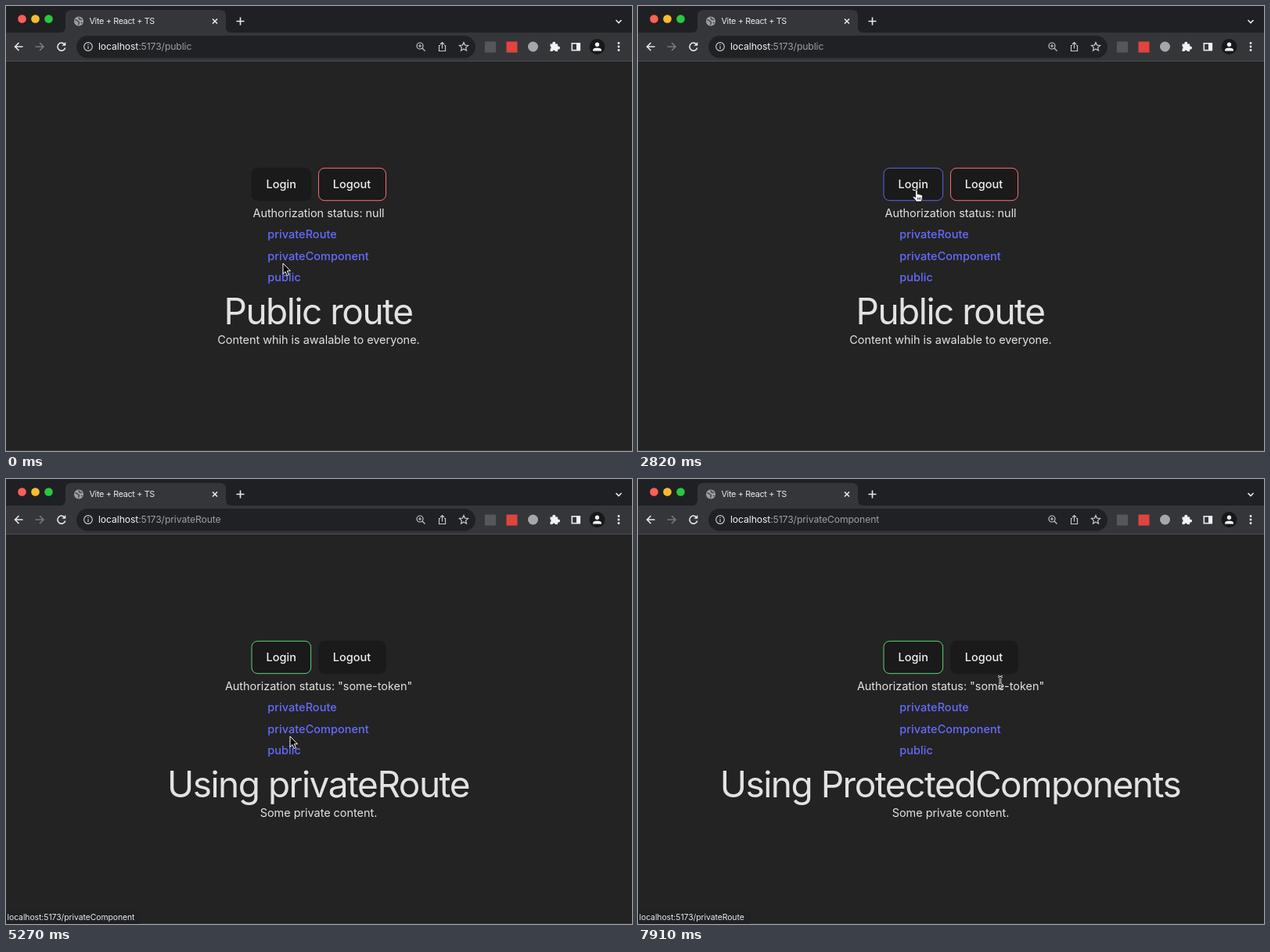
Write an HTML page that moves like this. It is 800 by 569 pixels and loops after 8 s.

```html
<!DOCTYPE html>
<html lang="en">
<head>
<meta charset="utf-8">
<title>Protected routes demo</title>
<style>
  html, body { margin: 0; width: 100%; height: 100%; overflow: hidden; background: #232323; }
  svg { display: block; width: 100vw; height: 100vh; }
  text { font-family: Inter, Roboto, sans-serif; font-optical-sizing: none; }
  .body { font-size: 14.5px; letter-spacing: -.05px; fill: #e2e2e2; }
  .mid { text-anchor: middle; }
  .strong { font-size: 14.5px; letter-spacing: .03px; font-weight: 500; fill: #f0f0f0; }
  .link { fill: #646cff; }
  .title { font-size: 46px; letter-spacing: -1.5px; fill: #e2e2e2; }
  .tab { font-size: 10.8px; letter-spacing: -.33px; fill: #e8eaed; }
  .url { font-size: 12.2px; letter-spacing: -.1px; fill: #9aa0a6; }
  .status { font-size: 10.4px; letter-spacing: -.06px; fill: #e8eaed; }
  .icon { fill: none; stroke: #e8eaed; stroke-width: 1.6; }
  .thin { fill: none; stroke: #c4c7ca; stroke-width: 1.2; }
</style>
</head>
<body>
<svg viewBox="0 0 800 569" preserveAspectRatio="none">
  <rect width="800" height="569" fill="#232323"/>

  <!-- window frame and tab -->
  <rect width="800" height="34" fill="#1f2023"/>
  <circle cx="20.5" cy="16.5" r="5.3" fill="#ff5f57"/>
  <circle cx="37.5" cy="16.5" r="5.3" fill="#febc2e"/>
  <circle cx="54.5" cy="16.5" r="5.3" fill="#28c840"/>
  <path d="M69 34q7 0 7-7V13q0-8 8-8H273q8 0 8 8V27q0 7 7 7z" fill="#35363a"/>
  <circle cx="93" cy="19.5" r="6" fill="#9aa0a6"/>
  <path d="M88.5 17.5l3 1.5 2 2-1 3M93 14.500l1 2.500 3 .5M96 21l1.500 1" fill="none" stroke="#45464a" stroke-width="1.5"/>
  <text class="tab" x="106.5" y="23.3">Vite + React + TS</text>
  <path class="icon" d="M264 16.500l6 6m0-6l-6 6"/>
  <path class="icon" d="M299.500 14.500v10m-5-5h10"/>
  <path class="icon" d="M779.500 18l3.500 3.500 3.500-3.500"/>

  <!-- toolbar -->
  <rect y="34" width="800" height="36" fill="#35363a"/>
  <rect y="70" width="800" height="1" fill="#4c4d50"/>
  <rect x="90" y="38" width="510" height="28.500" rx="14.250" fill="#202124"/>
  <path class="icon" d="M21.500 52H11.500m5-5l-5 5 5 5"/>
  <path class="icon" d="M37.500 52H48m-5-5l5 5-5 5" style="stroke:#77797d"/>
  <path class="icon" d="M75 49.200A5 5 0 1 0 75.700 53.500"/>
  <path d="M76.300 46v4.700h-4.700z" fill="#e8eaed"/>
  <circle class="thin" cx="105" cy="52" r="5.300"/>
  <path class="thin" d="M105 51.300v3.700M105 48.800v1.300"/>
  <text class="url" x="118" y="56.300"><tspan fill="#f1f3f4">localhost</tspan><tspan id="url"></tspan></text>
  <circle class="thin" cx="529" cy="51" r="4"/>
  <path class="thin" d="M532 54l3.500 3.500M527 51h4m-2-2v4"/>
  <path class="thin" d="M555 50.500h-1.500v7h8v-7H560M557.500 54.500V46.500m-2.500 2.500l2.500-2.500 2.500 2.500"/>
  <path class="thin" d="M585 46.500l1.600 3.600 4 .4-3 2.600.9 3.900-3.500-2-3.500 2 .9-3.900-3-2.600 4-.4z"/>
  <rect x="612" y="45.500" width="14" height="14" fill="#55575a"/>
  <rect x="639.500" y="45.500" width="14" height="14" fill="#e0443e"/>
  <circle cx="673.500" cy="52" r="6.500" fill="#a5a7aa"/>
  <path d="M695.500 48.500h3a2 2 0 1 1 3.600 0h3v3.200a2 2 0 1 1 0 3.600v2.700h-3.200a1.800 1.800 0 0 0-3.500 0h-2.900v-3.100a1.800 1.800 0 0 0 0-3.300z" fill="#f1f3f4"/>
  <rect x="723.300" y="47.800" width="10" height="8.800" class="icon"/>
  <rect x="729" y="47.500" width="5" height="9.500" fill="#f1f3f4"/>
  <circle cx="755.500" cy="52" r="10" fill="#17181a"/>
  <circle cx="755.500" cy="49.300" r="2.700" fill="#f1f3f4"/>
  <path d="M750 57.500v-1q0-3 5.500-3t5.500 3v1z" fill="#f1f3f4"/>
  <g fill="#e8eaed"><circle cx="783" cy="47.500" r="1.400"/><circle cx="783" cy="52" r="1.400"/><circle cx="783" cy="56.500" r="1.400"/></g>

  <!-- page -->
  <rect id="login" x="314" y="207.300" width="75.600" height="41.400" rx="7.500" fill="#1a1a1a"/>
  <rect id="logout" x="399.500" y="207.300" width="86" height="41.400" rx="7.500" fill="#1a1a1a"/>
  <text class="strong mid" x="351.700" y="233.300">Login</text>
  <text class="strong mid" x="442" y="233.300">Logout</text>
  <text class="body mid" id="auth" x="399.500" y="270.300"></text>
  <text class="strong link" id="route" x="334.300" y="297.300">privateRoute</text>
  <text class="strong link" id="component" x="334.300" y="324.700">privateComponent</text>
  <text class="strong link" id="public" x="334.300" y="352">public</text>
  <text class="title mid" id="title" x="399" y="407.300"></text>
  <text class="body mid" id="content" x="399.500" y="432.200"></text>

  <rect y="568" width="800" height="1" fill="#363636"/>
  <g id="bubble">
    <path id="plate" fill="#202124"/>
    <text class="status" id="status" x="1.500" y="564"></text>
  </g>

  <!-- pointers, hot spot at 0,0 -->
  <g id="arrow" stroke="#fff" stroke-linejoin="round">
    <path d="M0 0v13.500l3-2.800 2.200 5 2.300-1-2.200-4.900h4.200z" fill="#000"/>
  </g>
  <g id="hand" stroke="#000" stroke-width=".8" stroke-linejoin="round">
    <path d="M-1.500 1q0-1.500 1.300-1.500T1.200 1v4q1.800-1 2.400.4 1.500-.6 2.100.5 2-.4 2 1.500 0 4.300-1.500 7H-.5q-1.300-2.800-4-5-1-1.600.4-2 1.200 0 2.600 1.800z" fill="#fff"/>
    <path d="M1.600 9v3M3.500 9v3M5.300 9v3" fill="none"/>
  </g>
  <defs>
    <path id="stem" d="M-3-7.500q3 0 3 2.500v10q0 2.500-3 2.500M3-7.500q-3 0-3 2.500m0 10q0 2.500 3 2.500M-2 2.500H2"/>
  </defs>
  <g id="beam" fill="none">
    <use href="#stem" stroke="#fff" stroke-width="2.600"/>
    <use href="#stem" stroke="#111"/>
  </g>
</svg>
<script>
const LOOP = 8000;
const $ = id => document.getElementById(id);

// Path, heading, content, width of the link bubble
const pages = {
  public: ['public', 'Public route', 'Content whih is awalable to everyone.', 111],
  route: ['privateRoute', 'Using privateRoute', 'Some private content.', 143],
  component: ['privateComponent', 'Using ProtectedComponents', 'Some private content.', 171]
};

// Step tracks: [start ms, value]
const pageTrack = [[0, 'public'], [4300, 'component'], [5100, 'route'], [6250, 'public'], [7500, 'component']];
const bubbleTrack = [[0, ''], [250, 'route'], [1250, 'component'], [2250, 'route'], [2750, ''], [4180, 'component'],
  [4600, 'route'], [5230, 'component'], [6000, 'public'], [7150, 'component'], [7780, 'route']];
const hoverTrack = [[0, ''], [160, 'route'], [1200, 'component'], [1950, ''], [2180, 'route'], [2380, ''],
  [4120, 'component'], [4420, ''], [4560, 'route'], [5130, 'component'], [5230, ''], [5880, 'public'],
  [6980, 'component'], [7620, 'route'], [7780, '']];
const pointerTrack = [[0, 'arrow'], [120, 'hand'], [1880, 'arrow'], [2150, 'hand'], [2420, 'beam'], [2560, 'hand'],
  [3480, 'beam'], [3600, 'arrow'], [4080, 'hand'], [5230, 'arrow'], [5880, 'hand'], [7800, 'beam']];

// Pointer path: [ms, x, y]
const path = [[0, 354, 329], [200, 356, 316], [400, 362, 288], [820, 362, 287], [1100, 372, 284], [1300, 376, 312],
  [1700, 358, 320], [1910, 355, 330], [2100, 358, 332], [2300, 366, 292], [2450, 372, 272], [2700, 356, 236],
  [3200, 356, 234], [3400, 364, 240], [3550, 374, 261], [3800, 390, 372], [3950, 390, 374], [4150, 372, 322],
  [4450, 368, 303], [4650, 372, 291], [5050, 372, 290], [5270, 363, 329], [5750, 356, 338], [5950, 350, 349],
  [6550, 349, 352], [6900, 350, 348], [7100, 372, 322], [7500, 380, 319], [7700, 400, 295], [7910, 463, 260],
  [8000, 470, 252]];

const at = (track, t) => track.findLast(step => step[0] <= t)[1];
const clamp = v => Math.min(1, Math.max(0, v));
const ease = v => v * v * (3 - 2 * v);
const fade = (t, start) => ease(clamp((t - start) / 250));
const mix = (a, b, k) => `rgb(${a.map((v, i) => Math.round(v + (b[i] - v) * k))})`;

const DARK = [26, 26, 26], BLUE = [100, 108, 255], GREEN = [92, 214, 120], RED = [255, 110, 110];

function pointerAt(t) {
  const i = Math.max(1, path.findIndex(p => p[0] > t));
  const [t0, x0, y0] = path[i - 1], [t1, x1, y1] = path[i];
  const k = ease((t - t0) / (t1 - t0));
  return [x0 + (x1 - x0) * k, y0 + (y1 - y0) * k];
}

function setText(id, value) {
  const el = $(id);
  if (el.textContent !== value) el.textContent = value;
}

function draw(t) {
  const [slug, title, content] = pages[at(pageTrack, t)];
  setText('url', ':5173/' + slug);
  setText('title', title);
  setText('content', content);
  setText('auth', 'Authorization status: ' + (t < 2950 ? 'null' : '"some-token"'));

  $('login').setAttribute('stroke', t < 3530
    ? mix(DARK, BLUE, fade(t, 2620))
    : mix(BLUE, GREEN, fade(t, 3530)));
  $('logout').setAttribute('stroke', mix(RED, DARK, fade(t, 2950)));

  const hover = at(hoverTrack, t);
  for (const id in pages) $(id).style.fill = id === hover ? '#535bf2' : '#646cff';

  const target = at(bubbleTrack, t);
  $('bubble').style.display = target ? '' : 'none';
  if (target) {
    const [name, , , width] = pages[target];
    setText('status', 'localhost:5173/' + name);
    $('plate').setAttribute('d', `M0 552H${width - 4}q4 0 4 4V569H0z`);
  }

  const shape = at(pointerTrack, t);
  const [x, y] = pointerAt(t);
  for (const id of ['arrow', 'hand', 'beam']) {
    $(id).style.display = id === shape ? '' : 'none';
    $(id).setAttribute('transform', `translate(${x.toFixed(2)} ${y.toFixed(2)})`);
  }
}

const begin = performance.now();
function tick() {
  draw((performance.now() - begin) % LOOP);
  requestAnimationFrame(tick);
}
tick();
</script>
</body>
</html>
```
